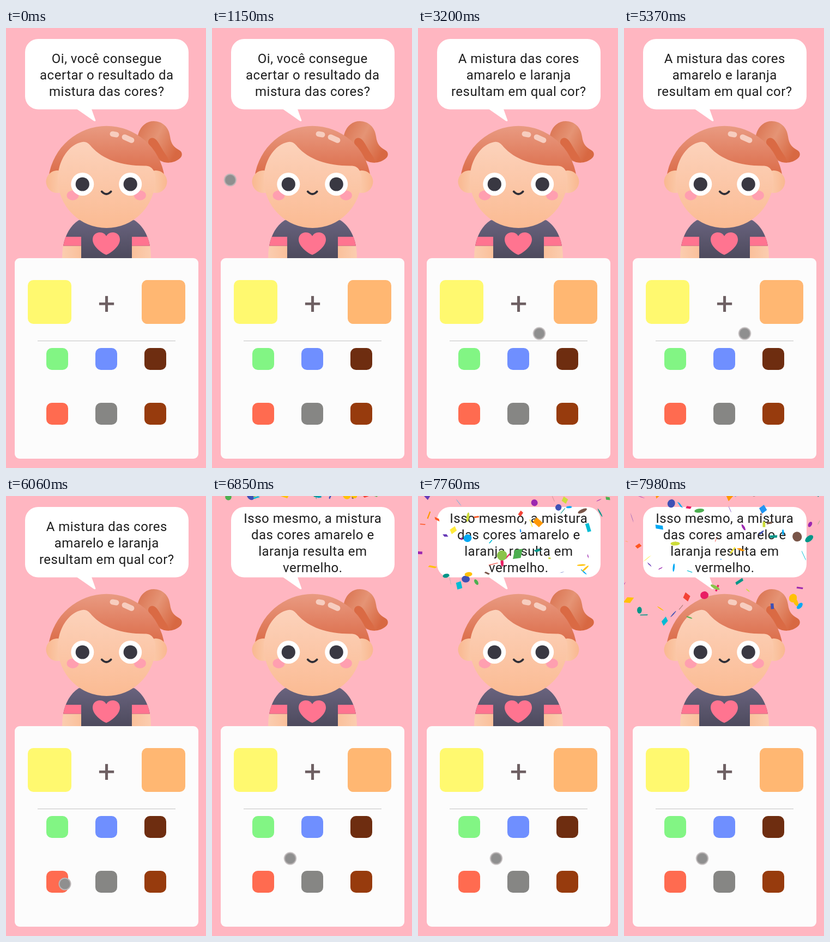
Animation of 367x803 px, one loop 8000 ms. Source, as an HTML page with a canvas:

```html
<!DOCTYPE html>
<html lang="pt-BR">
<head>
<meta charset="utf-8">
<title>Mistura das cores</title>
<style>
  html, body { margin: 0; width: 100%; height: 100%; overflow: hidden; background: #ffb6c1; }
  svg, canvas { position: absolute; left: 0; top: 0; width: 367px; height: 803px; }
  text { font: 24px Roboto, sans-serif; letter-spacing: .5px; text-anchor: middle; fill: #1e1e1e; }
  .plus { font-size: 56px; letter-spacing: 0; fill: #6e6063; }

  .say { visibility: hidden; animation: 8s step-end infinite; }
  .ask { animation-name: ask; }
  .hint { animation-name: hint; }
  .win { animation-name: win; }
  @keyframes ask { 0% { visibility: visible } 40%, 100% { visibility: hidden } }
  @keyframes hint { 0% { visibility: hidden } 40% { visibility: visible } 77.625%, 100% { visibility: hidden } }
  @keyframes win { 0% { visibility: hidden } 77.625%, 100% { visibility: visible } }

  #cursor { animation: move 8s linear infinite; }
  @keyframes move {
    0%, 12.12% { transform: translate(-20px, 228px) }
    12.125% { transform: translate(0, 228px) }
    21.125% { transform: translate(133px, 424px) }
    21.875% { transform: translate(167.5px, 466.5px) }
    22.75% { transform: translate(193.5px, 528.5px) }
    23.75% { transform: translate(210px, 560px) }
    25% { transform: translate(217px, 571px) }
    27.5% { transform: translate(220px, 564px) }
    30.25%, 32.25% { transform: translate(221.5px, 557px) }
    33% { transform: translate(219px, 557px) }
    34.125%, 67.1% { transform: translate(222.5px, 557.5px) }
    67.125% { transform: translate(221.5px, 557.5px); animation-timing-function: ease-in-out }
    73.5%, 75.74% { transform: translate(109px, 708px) }
    75.75%, 81.75% { transform: translate(108px, 708px); animation-timing-function: ease-in-out }
    85%, 100% { transform: translate(143.5px, 661.5px) }
  }
</style>
</head>
<body>
<svg viewBox="0 0 367 803">
  <defs>
    <linearGradient id="hair" x2="0" y2="1">
      <stop stop-color="#e99b82"/><stop offset="1" stop-color="#db6b48"/>
    </linearGradient>
    <linearGradient id="tail" x2="1" y2=".5">
      <stop stop-color="#d9704d"/><stop offset=".5" stop-color="#e59475"/><stop offset="1" stop-color="#d86842"/>
    </linearGradient>
    <linearGradient id="face" x2="0" y2="1">
      <stop stop-color="#fcd2bb"/><stop offset="1" stop-color="#fbbb93"/>
    </linearGradient>
    <linearGradient id="skin">
      <stop stop-color="#f9b890"/><stop offset="1" stop-color="#fcd4b9"/>
    </linearGradient>
    <linearGradient id="arm">
      <stop stop-color="#fbcdb0"/><stop offset="1" stop-color="#fac09b"/>
    </linearGradient>
    <linearGradient id="shirt" gradientUnits="userSpaceOnUse" x1="0" y1="350" x2="0" y2="420">
      <stop stop-color="#69637e"/><stop offset="1" stop-color="#4d4a5d"/>
    </linearGradient>
    <g id="side">
      <path d="M105 396Q103 408 103 421H138V396Z" fill="url(#arm)"/>
      <path d="M140 349L133 351C118 361 109 377 105 397.5H138V421H186V349Z" fill="url(#shirt)"/>
      <path d="M109.5 381H138V397.5H105Q106.5 389 109.5 381Z" fill="#ff7490"/>
    </g>
    <circle id="ear" cx="94" cy="280.5" r="20.5" fill="url(#skin)"/>
    <g id="eye">
      <ellipse cx="122.5" cy="305.5" rx="11" ry="9" fill="#ff9fb0"/>
      <circle cx="140.3" cy="285" r="21" fill="#fff"/>
      <circle cx="140.3" cy="285" r="12.6" fill="#393842"/>
    </g>
  </defs>

  <path d="M130 148H157L164.5 169Q164 171 161 169.5Z" fill="#fff"/>
  <rect x="35" y="20" width="300" height="128.5" rx="24" fill="#fff"/>
  <g class="say ask">
    <text x="184.8" y="64">Oi, você consegue</text>
    <text x="184.8" y="94">acertar o resultado da</text>
    <text x="184.8" y="124">mistura das cores?</text>
  </g>
  <g class="say hint">
    <text x="184.8" y="64">A mistura das cores</text>
    <text x="184.8" y="94">amarelo e laranja</text>
    <text x="184.8" y="124">resultam em qual cor?</text>
  </g>
  <g class="say win">
    <text x="184.8" y="49">Isso mesmo, a mistura</text>
    <text x="184.8" y="79">das cores amarelo e</text>
    <text x="184.8" y="109">laranja resulta em</text>
    <text x="184.8" y="139">vermelho.</text>
  </g>

  <!-- Girl -->
  <path d="M242 196C246 179 258 170 271 170C287 170 299 181 301 198C303 213 309 218 318 223C324 226 324 233 320 237C311 245 301 247 291 245C270 240 250 220 242 196Z" fill="url(#tail)"/>
  <path d="M261 210C260 203 266 199 271 201C278 204 281 212 286 220C291 230 299 236 299 245.5L290 245C276 238 266 222 261 210Z" fill="#da6a44"/>
  <use href="#side"/>
  <use href="#side" transform="matrix(-1 0 0 1 369 0)"/>
  <path d="M184 414C176 411 159 399 159 386C159 378 165 373 172 373C178 373 182 376 184 380C186 376 190 373 196 373C203 373 209 378 209 386C209 399 192 411 184 414Z" fill="#ff7490"/>
  <path d="M78.5 270A107.2 107.2 0 0 1 290.5 270Z" fill="url(#hair)"/>
  <use href="#ear"/>
  <use href="#ear" transform="matrix(-1 0 0 1 369 0)"/>
  <path d="M95 275.5C95 245 113 214 138 208.5C147 206 152 211 157 217C178 240 212 252 257 251.5C268 252 274 261 274 275.5A89.5 89.5 0 0 1 95 275.5Z" fill="url(#face)"/>
  <rect x="-8.5" y="-5" width="17" height="10" rx="5" transform="translate(199 194) rotate(10)" fill="#f7cdbf"/>
  <rect x="-12" y="-5" width="24" height="10" rx="5" transform="translate(224 202) rotate(24)" fill="#f7cdbf"/>
  <use href="#eye"/>
  <use href="#eye" transform="matrix(-1 0 0 1 368.5 0)"/>
  <path d="M175.8 298.5Q184.2 307.5 192.6 298.5" fill="none" stroke="#302f37" stroke-width="4" stroke-linecap="round"/>

  <!-- Game card -->
  <rect x="16" y="420" width="337" height="366" rx="9" fill="#fcfcfc"/>
  <rect x="40" y="460" width="80" height="80" rx="10" fill="#fff96f"/>
  <rect x="249" y="460" width="80" height="80" rx="10" fill="#ffb772"/>
  <text class="plus" x="184.6" y="522">+</text>
  <path d="M58 571H311" stroke="#dedede" stroke-width="2"/>
  <g id="answers"></g>
  <circle id="cursor" r="10.5" fill="#8f8f8f" stroke="#bbb5b6" stroke-width="2"/>
</svg>
<canvas id="confetti" width="367" height="803"></canvas>

<script>
const $ = id => document.getElementById(id);

$('answers').innerHTML = ['#82f584', '#6f8fff', '#6e2d10', '#ff6b50', '#868684', '#973b0d']
  .map((c, i) => `<rect x="${74 + i % 3 * 90}" y="${i < 3 ? 584 : 684}" width="40" height="40" rx="10" fill="${c}"/>`)
  .join('');

const LAUNCH = 6680, GRAVITY = 0.1, FRICTION = 0.99;
const COLORS = ['#f44336', '#e91e63', '#9c27b0', '#673ab7', '#3f51b5', '#2196f3', '#03a9f4', '#00bcd4', '#009688',
  '#4caf50', '#8bc34a', '#cddc39', '#ffeb3b', '#ffc107', '#ff9800', '#ff5722', '#795548'];

let seed = 20;
const random = (a, b) => {
  seed = (Math.imul(seed, 1664525) + 1013904223) >>> 0;
  return a + (b - a) * seed / 2 ** 32;
};

const pieces = Array.from({ length: 180 }, () => ({
  x: random(0, 367),
  vx: random(-4, 4),
  vy: random(-10, 0),
  w: random(5, 20),
  h: random(5, 20),
  r: random(5, 10),
  angle: random(0, 2 * Math.PI),
  spin: random(-0.2, 0.2),
  flip: random(0, 2),
  shape: Math.floor(random(0, 3)),
  color: COLORS[Math.floor(random(0, COLORS.length))]
}));

const ctx = $('confetti').getContext('2d');
const clock = $('cursor').getAnimations()[0];

function drawPiece(p, n) {
  // Distance per unit of starting speed after n steps with drag
  const drag = (1 - FRICTION ** n) / (1 - FRICTION);
  const fall = GRAVITY / (1 - FRICTION) * (n - drag);
  const angle = p.angle + p.spin * n;
  ctx.save();
  ctx.translate(p.x + p.vx * drag, p.vy * drag + fall);
  ctx.rotate(angle);
  ctx.scale(1, Math.abs((p.flip + n * 0.1) % 2 - 1));
  ctx.rotate(angle);
  ctx.fillStyle = p.color;
  ctx.beginPath();
  if (p.shape === 0) ctx.arc(0, 0, p.r, 0, 2 * Math.PI);
  else if (p.shape === 1) ctx.rect(-p.w / 2, -p.h / 2, p.w, p.h);
  else ctx.rect(-p.w / 6, -p.h / 2, p.w / 3, p.h);
  ctx.fill();
  ctx.restore();
}

function draw() {
  const t = (clock.currentTime || 0) % 8000;
  ctx.clearRect(0, 0, 367, 803);
  if (t > LAUNCH) pieces.forEach(p => drawPiece(p, (t - LAUNCH) * 0.06));
  requestAnimationFrame(draw);
}
requestAnimationFrame(draw);
</script>
</body>
</html>
```
